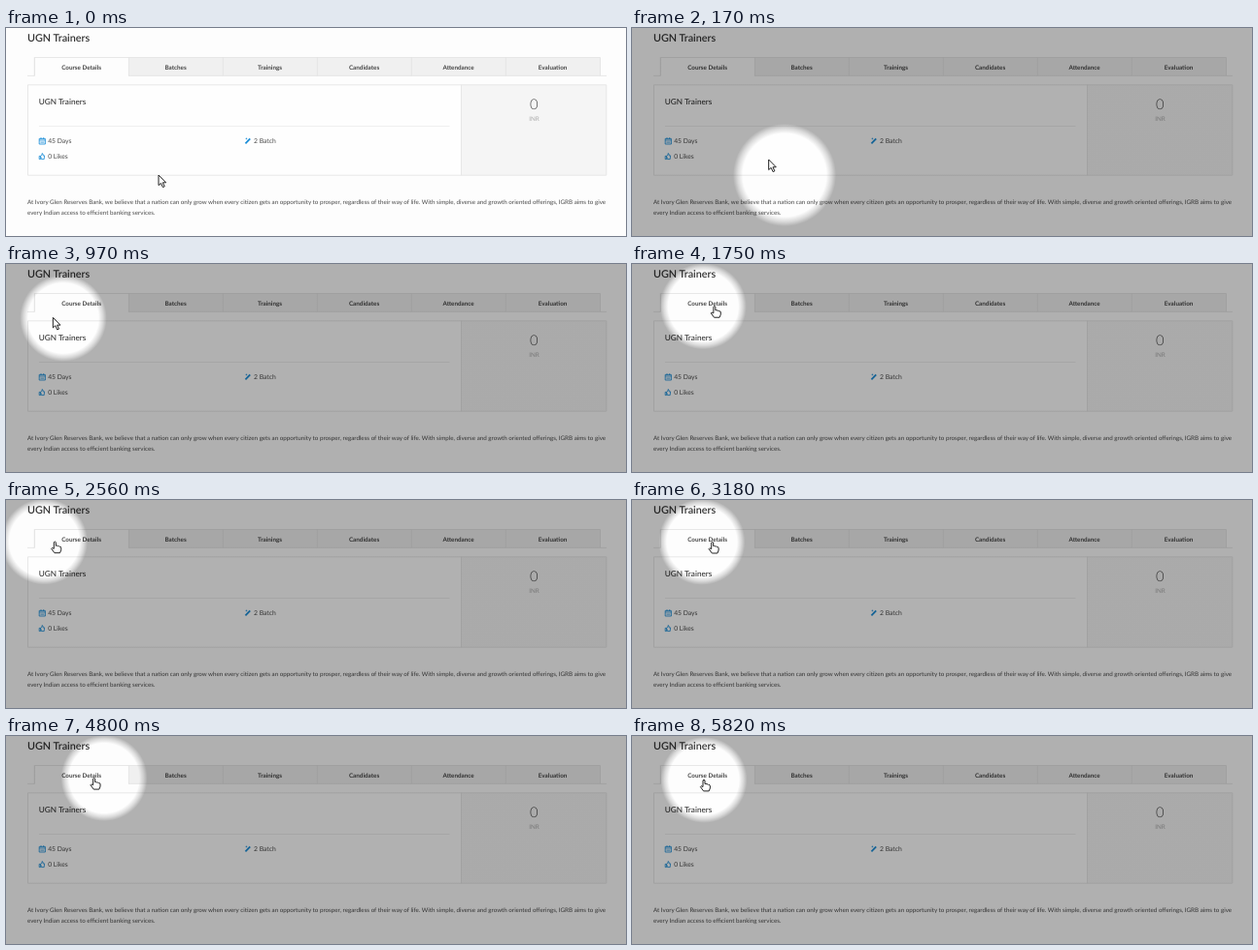
An HTML page that plays this animation: 638x215 px, repeating every 7.52 s.

```html
<!DOCTYPE html>
<html lang="en">
<head>
<meta charset="utf-8">
<title>Course page spotlight</title>
<style>
html, body { margin: 0; width: 100%; height: 100%; overflow: hidden; background: #fdfdfd; }
svg { display: block; width: 638px; height: 215px; }
text { font-family: Lato, "Open Sans", sans-serif; font-size: 6.235px; fill: #4a4a4a; text-rendering: geometricPrecision; }
.title { font-size: 10.8px; font-weight: 600; fill: #333; }
.name { font-size: 8.2px; font-weight: 500; fill: #333; }
.fact { font-size: 6.78px; }
.tab { font-size: 6.3px; font-weight: 700; fill: #444; text-anchor: middle; }
.price { font-size: 14.8px; font-weight: 300; text-anchor: middle; }
.unit { font-size: 6.3px; fill: #aaa; text-anchor: middle; }
.line { fill: none; stroke: #e2e2e2; stroke-width: .8; }
.icon { fill: none; stroke: #1e8fd8; stroke-width: .85; }
.pointer { fill: #fff; stroke: #222; stroke-width: 1; stroke-linejoin: round; }
</style>
</head>
<body>
<svg viewBox="0 0 638 215">
  <defs>
    <radialGradient id="light" gradientUnits="userSpaceOnUse">
      <stop offset=".81" stop-opacity="0"/>
      <stop offset=".91" stop-opacity=".14"/>
      <stop offset="1" stop-opacity=".305"/>
    </radialGradient>
  </defs>
  <rect width="638" height="215" fill="#fdfdfd"/>
  <text class="title" x="22" y="13.8">UGN Trainers</text>

  <g id="tabs">
    <rect x="126" y="30.5" width="485.5" height="18.8" fill="#f0f0f0"/>
    <path class="line" d="M22 49.4H29.4V30.5H611.5V49.4M126 49.4H618"/>
  </g>

  <rect x="22.5" y="58.8" width="595.3" height="93.4" fill="#fefefe"/>
  <rect x="468.5" y="58.8" width="149.3" height="93.4" fill="#f5f5f5"/>
  <path class="line" d="M22.5 58.8H617.8V152.2H22.5ZM468.5 58.8V152.2"/>
  <path class="line" d="M34 101.5H456.5" style="stroke:#ebebeb"/>

  <text class="name" x="33.8" y="78.6">UGN Trainers</text>
  <text class="fact" x="43.2" y="119.4">45 Days</text>
  <text class="fact" x="255" y="119.4">2 Batch</text>
  <text class="fact" x="43.2" y="135.4">0 Likes</text>
  <text class="price" x="543.4" y="84">0</text>
  <text class="unit" x="543.4" y="96.2">INR</text>

  <path class="icon" d="M34.2 114.4H40.4V120H34.2ZM34.2 116H40.4M36 113.2V115M38.7 113.2V115M35.4 118.1H39.4"/>
  <path class="icon" d="M246.4 119.4L251.2 114.4" style="stroke-width:1.8"/>
  <path class="icon" d="M247.4 113.6V115.2M246.6 114.4H248.2" style="stroke-width:.7"/>
  <path class="icon" d="M34.2 132.4H35.6V135.6H34.2ZM35.6 132.4L37 130.8V129.6Q38.4 129.4 38.1 131.9H39.6L39.2 135.6H36.4Z"/>

  <text x="22" y="182.4">At Ivory Glen Reserves Bank, we believe that a nation can only grow when every citizen gets an opportunity to prosper, regardless of their way of life. With simple, diverse and growth oriented offerings, IGRB aims to give</text>
  <text x="22" y="193.2">every Indian access to efficient banking services.</text>

  <rect id="shade" width="638" height="215" fill="url(#light)"/>
  <path id="arrow" class="pointer" d="M0 0V10.6L2.5 8.4L4.4 12.6L6.2 11.8L4.3 7.8H7.6Z"/>
  <path id="hand" class="pointer" d="M-1 .6Q0-.8 1 .6V4.2Q2.2 3.4 3 4.6Q4.2 4 4.8 5.2Q6.4 4.8 6.4 6.4V8.6L5.2 11.6H-.4L-3.6 7.2Q-3.4 5.6-1 7.2Z"/>
</svg>
<script>
const LOOP = 7520, START = 20, STEP = 133.6, PAUSE = 150;
const pauses = [2570, 3450, 4120, 5360];
// Turning points of the path: step, x, y.
const path = [
  [1, 157, 152], [7, 59, 56], [8.5, 43, 55], [10, 50, 44], [14, 96.5, 43.5],
  [19, 39.5, 43], [24, 93.5, 43.5], [26, 66.5, 43.5], [28, 56.5, 43],
  [32, 101, 43.5], [36, 59.5, 43.5], [38, 74, 45.3]
];
const get = id => document.getElementById(id);
const clamp = (v, lo, hi) => Math.min(hi, Math.max(lo, v));

["Course Details", "Batches", "Trainings", "Candidates", "Attendance", "Evaluation"].forEach((label, i) => {
  const x = 29.4 + 97 * i;
  get("tabs").insertAdjacentHTML("beforeend",
    `<path class="line" d="M${x} 30.5V49.4"/><text class="tab" x="${x + 48.2}" y="43">${label}</text>`);
});

function stepAt(t) {
  const rested = pauses.reduce((sum, p) => sum + clamp(t - p, 0, PAUSE), 0);
  return Math.floor((t - START - rested) / STEP);
}

function pointAt(step) {
  const s = clamp(step, path[0][0], path.at(-1)[0]);
  const i = Math.max(1, path.findIndex(p => p[0] >= s));
  const [s0, x0, y0] = path[i - 1], [s1, x1, y1] = path[i];
  const u = (s - s0) / (s1 - s0);
  return [x0 + (x1 - x0) * u, y0 + (y1 - y0) * u];
}

function placePointer([x, y]) {
  const over = y < 50;
  get("arrow").style.display = over ? "none" : "";
  get("hand").style.display = over ? "" : "none";
  get(over ? "hand" : "arrow").setAttribute("transform", `translate(${x} ${y})`);
}

function draw(now) {
  const step = stepAt(now % LOOP);
  const [cx, cy] = pointAt(step);
  const r = 44.5 + 8.5 * Math.exp((1 - Math.max(0, step)) / 1.6);
  Object.entries({ cx, cy, r }).forEach(([k, v]) => get("light").setAttribute(k, v));
  get("shade").style.opacity = clamp((step + 1) / 2, 0, 1);
  placePointer(pointAt(step + 1)); // the light trails by one step
  requestAnimationFrame(draw);
}
requestAnimationFrame(draw);
</script>
</body>
</html>
```
